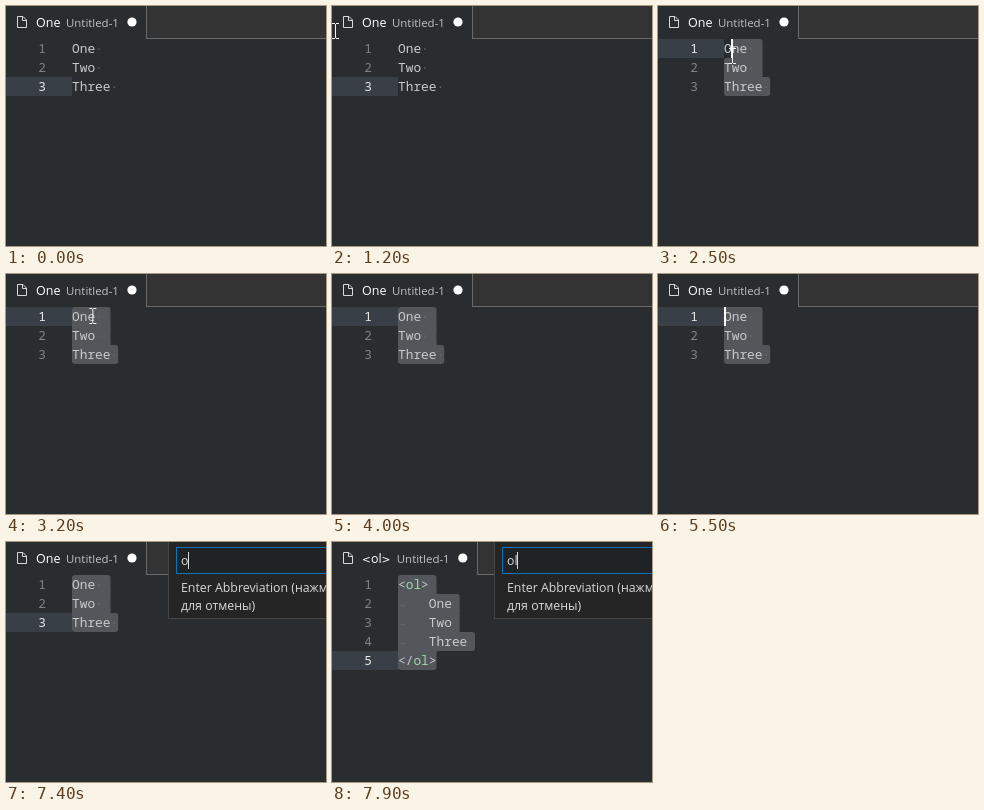
Animation, 320 px wide and 240 px high, one loop 8000 ms. Source, as an HTML page:

```html
<!DOCTYPE html>
<html lang="en">
<head>
<meta charset="utf-8">
<title>Wrap with abbreviation</title>
<style>
  html, body { margin: 0; width: 100%; height: 100%; overflow: hidden; background: #2a2d30; }
  svg { display: block; width: 320px; height: 240px; }
  text { white-space: pre; }
  .code { font: 12.83px "Noto Sans Mono", monospace; fill: #c8cbcd; }
  .ui { font: 12.35px "Open Sans", sans-serif; fill: #d8d8d8; }
  .title { font-size: 12.5px; font-weight: 500; fill: #fff; }
  .title tspan { font: 10.6px "DejaVu Sans", sans-serif; }
  .detail { font-size: 11.45px; font-weight: 500; fill: #c0c2c3; }
  .num { text-anchor: end; fill: #7f8386; }
  .num.active { fill: #e8e8e8; }
  .space { fill: #666a6c; }
  .tag { fill: #9fd8a4; }
  .sel { fill: #53575b; }
</style>
</head>
<body>
<svg id="stage" viewBox="0 0 320 240"></svg>
<script>
const LOOP = 8000, TICK = 100, BLINK = 480;
const LEFT = 66, TOP = 33, ROW = 19, CHAR = 7.7;
const CLICK = 2000, DRAG = 2200, DROP = 2600, OPEN = 5900, TYPE = 7400;
const KEY_GAP = 300, PREVIEW_LAG = 200;
const words = ['One', 'Two', 'Three'];
const stage = document.getElementById('stage');
const pen = document.createElement('canvas').getContext('2d');
pen.font = '12.35px "Open Sans", sans-serif';

// Pointer moves: start, end, x, y; it rests in between.
const moves = [
  [1200, 1400, 128.5, 90], [1500, 1700, 121.5, 86], [1900, 2100, 98.5, 71.5],
  [2100, 2500, 74.5, 50], [2500, DROP, 69.5, 50], [3000, 3300, 95.5, 38],
  [3800, 3900, 88.5, 214]
];

function mouseAt(t) {
  let x = 3.5, y = 25;
  for (const [start, end, toX, toY] of moves) {
    const p = Math.min(1, Math.max(0, (t - start) / (end - start)));
    x += (toX - x) * p;
    y += (toY - y) * p;
  }
  return { x, y };
}

// The dragged end of the selection follows the pointer.
function caretAt(t) {
  if (t < DRAG) return { row: 2, col: 6 };
  const { x, y } = mouseAt(Math.min(t, DROP));
  return { row: Math.floor((y - TOP) / ROW), col: Math.round((x - LEFT) / CHAR) };
}

const blinkOn = age => Math.floor(Math.max(0, age) / BLINK) % 2 === 0;
const typedAt = t => 'ol'.slice(0, Math.max(0, 1 + Math.floor((t - TYPE) / KEY_GAP)));

function linesFor(tag) {
  if (!tag) return words.map(w => ({ indent: 0, size: w.length + 1, html: w + '<tspan class="space">·</tspan>' }));
  const name = `<tspan class="tag">${tag}</tspan>&gt;`;
  return [
    { indent: 0, size: tag.length + 2, html: '&lt;' + name },
    ...words.map(w => ({ indent: 4, size: w.length, html: w })),
    { indent: 0, size: tag.length + 3, html: '&lt;/' + name }
  ];
}

const rect = (x, y, w, h, fill) =>
  `<rect x="${x}" y="${y}" width="${w}" height="${h}" fill="${fill}"/>`;
const text = (x, y, cls, s) => `<text x="${x}" y="${y}" class="${cls}">${s}</text>`;
const colX = c => LEFT + c * CHAR;
const rowY = r => TOP + r * ROW;
const code = (row, col, s, cls = '') => text(colX(col), rowY(row) + 14, 'code ' + cls, s);

function tabs(tag) {
  const shift = tag ? 3.2 * tag.length - 1.6 : 0;
  const edge = Math.round(140 + shift);
  const name = tag ? `<tspan>&lt;</tspan>${tag}<tspan>&gt;</tspan>` : words[0];
  return rect(edge, 0, 320 - edge, 33, '#686a6b') +
    rect(edge + 1, 0, 319 - edge, 32, '#333333') +
    '<path d="M11.5 10.5h5.5l3.5 3.5v7.5h-9zM16.5 10.5v4h4" fill="none" stroke="#d8d8d8"/>' +
    text(30, 21, 'ui title', name) +
    text(60 + shift, 21, 'ui detail', 'Untitled-1') +
    `<circle cx="${126 + shift}" cy="16" r="4.6" fill="#fff"/>`;
}

function selection(lines, from) {
  let out = '', above;
  lines.forEach(({ indent, size }, i) => {
    if (i < from.row) return;
    const y = rowY(i), x = colX(i === from.row ? from.col : 0);
    const end = colX(indent + size + (i < lines.length - 1));
    out += `<rect class="sel" x="${x}" y="${y}" width="${end - x}" height="${ROW}" rx="3"/>`;
    if (above) {
      // Square off the corners where two rows meet.
      const l = Math.max(x, above.x), r = Math.min(end, above.end);
      out += `<rect class="sel" x="${l}" y="${y - 4}" width="${r - l}" height="8"/>`;
    }
    above = { x, end };
  });
  return out;
}

function editor(t, tag) {
  const lines = linesFor(tag);
  const caret = caretAt(t);
  const active = t < OPEN ? caret.row : lines.length - 1;
  let out = rect(0, rowY(active), LEFT, ROW, '#383f46');
  if (t >= DRAG) out += selection(lines, tag ? { row: 0, col: 0 } : caret);
  lines.forEach(({ indent, html }, i) => {
    out += text(40, rowY(i) + 14, 'code num' + (i === active ? ' active' : ''), i + 1);
    if (indent) out += code(i, 0, '→', 'space');
    out += code(i, indent, html);
  });
  if (t >= CLICK && t < OPEN && blinkOn(t - DROP + 40))
    out += rect(Math.floor(LEFT + caret.col * 7.55), rowY(caret.row), 2, ROW, '#fff');
  return out;
}

function prompt(t) {
  if (t < OPEN) return '';
  const typed = typedAt(t);
  const lastKey = typed ? TYPE + (typed.length - 1) * KEY_GAP : OPEN - 80;
  const caretX = 175 + Math.floor(pen.measureText(typed).width);
  return rect(162, 0, 158, 77, '#454647') + rect(163, 0, 157, 76, '#252526') +
    rect(170, 5, 150, 27, '#0b74b8') + rect(171, 6, 149, 25, '#202326') +
    text(175, 23, 'ui', typed) +
    (blinkOn(t - lastKey) ? rect(caretX, 10, 1, 17, '#d8d8d8') : '') +
    text(175, 50, 'ui', 'Enter Abbreviation (нажмите') +
    text(175, 68, 'ui', 'для отмены)');
}

function pointer(t) {
  if (t < moves[0][0] || t > moves[moves.length - 1][1]) return '';
  const { x, y } = mouseAt(t);
  return `<path transform="translate(${x} ${y})" fill="none" stroke="#f4f4f4"
    d="M-3.5 -7.5h3M.5 -7.5h3M0 -7v14M-3.5 7.5h3M.5 7.5h3"/>`;
}

let shown = -1;
function frame() {
  const t = Math.floor(performance.now() % LOOP / TICK) * TICK;
  if (t !== shown) {
    shown = t;
    const tag = typedAt(t - PREVIEW_LAG);
    stage.innerHTML = tabs(tag) + editor(t, tag) + prompt(t) + pointer(t);
  }
  requestAnimationFrame(frame);
}
frame();
</script>
</body>
</html>
```
